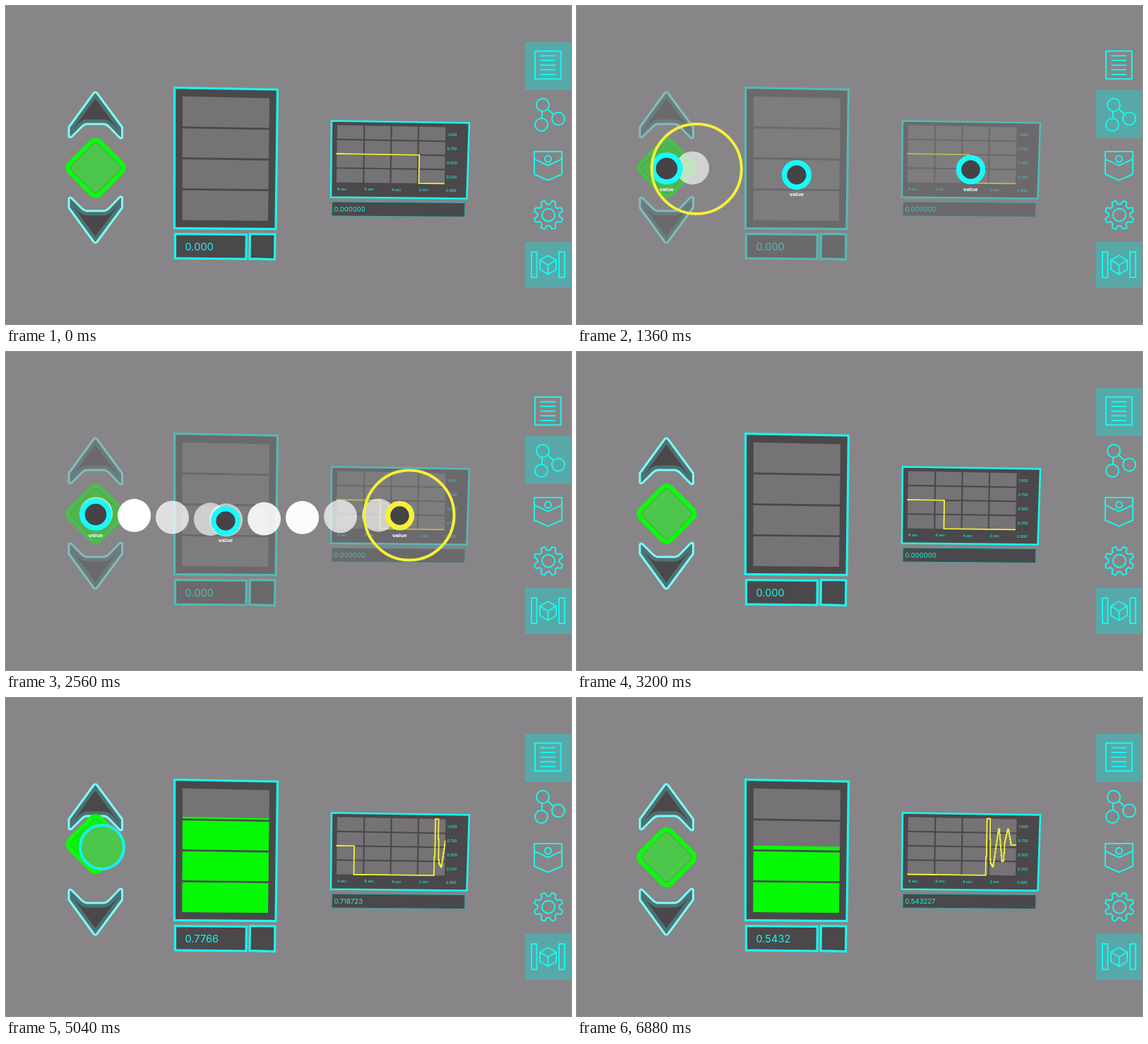
Animation of 800x450 px, one loop 6960 ms. Source, as an HTML page:

```html
<!DOCTYPE html>
<html lang="en">
<head>
<meta charset="utf-8">
<title>Linked controls</title>
<style>
  html, body { margin: 0; width: 100%; height: 100%; overflow: hidden; background: #878587; }
  svg { display: block; width: 100vw; height: 100vh; }
  text { font-family: Inter, Roboto, sans-serif; fill: #1cf5ec; }
  .node text { font: bold 8px "Liberation Sans", Arial, sans-serif; fill: #fff; text-anchor: middle; }
  .frame { fill: #4a484a; stroke: #18f7ee; stroke-width: 3.2; }
  .cell { fill: #757375; }
  .icon { fill: none; stroke: #18f7ee; stroke-width: 2; stroke-linejoin: round; }
  .lit { fill: #59a8a8; }
  .small text { font-size: 5.2px; font-weight: 500; }
</style>
</head>
<body>
<svg viewBox="0 0 800 450">
  <defs>
    <path id="chevron" d="M126.5 122Q128 122 129 123.5L164.5 171.5V186Q163 188 160.5 186L146 171Q142 167 138 167H115Q111 167 107 171L93 185Q90 187 89 184.5V171.5L124 123.5Q125 122 126.5 122Z"/>
    <clipPath id="chevronClip"><use href="#chevron"/></clipPath>
    <clipPath id="plotClip"><rect x="467.5" y="166" width="155" height="88"/></clipPath>
    <g id="arrow">
      <use href="#chevron" fill="#4a484a" stroke="#4d7274" stroke-width="13" clip-path="url(#chevronClip)"/>
      <use href="#chevron" fill="none" stroke="#7ffcf8" stroke-width="3" stroke-linejoin="round"/>
    </g>
  </defs>

  <g id="panels">
    <use href="#arrow"/>
    <use href="#arrow" transform="matrix(1 0 0 -1 0 457)"/>

    <path class="frame" d="M238.7 115.5L384.5 118.2L382 315.7L238.5 314.5Z"/>
    <g id="sliderCells"></g>
    <g id="sliderFill"></g>
    <path class="frame" d="M239.5 322.5L340.500 323.500L340 358L239.500 357Z"/>
    <path class="frame" d="M345.5 322.5L381 323L380.500 358.500L345 357.700Z"/>
    <text id="sliderText" x="253.5" y="346" font-size="14.6"></text>

    <path class="frame" style="stroke-width:2.6" d="M461 162.5L656 165.500L652.500 272.500L460 270.500Z"/>
    <g id="plotCells"></g>
    <g class="small" id="plotLabels"></g>
    <path id="plot" fill="none" stroke="#f5f03a" stroke-width="1.8" clip-path="url(#plotClip)"/>
    <path d="M461.5 277L650 278.500L649.500 298.500L461 297Z" fill="#4a484a" stroke="#2fa9a6"/>
    <text id="plotText" x="464.5" y="291" font-size="9.5"></text>

    <g id="diamond">
      <rect id="diamondFace" x="-30.5" y="-30.5" width="61" height="61" rx="9" transform="rotate(45)" stroke="#0bfb0b" stroke-width="6"/>
      <rect x="-26.5" y="-26.5" width="53" height="53" rx="5" transform="rotate(45)" fill="none" stroke="#35a035" opacity=".6"/>
    </g>
    <circle id="touch" r="31" fill="#4cc74c" stroke="#18eef5" stroke-width="4"/>
  </g>

  <g id="linking">
    <g id="balls" fill="#fff"></g>
    <g id="nodes"></g>
    <circle id="ring" r="63.5" fill="none" stroke="#f5f03a" stroke-width="4"/>
  </g>

  <rect class="lit" id="modeBox" x="734.5" width="66" height="68"/>
  <rect class="lit" x="734.5" y="333.5" width="66" height="65.5"/>
  <g class="icon">
    <path d="M749 63.700H785.700V103.200H749ZM756.500 70.500H778M756.500 77H778M756.500 83.700H778M756.500 90.300H778M756.500 97H778"/>
    <path d="M759 149V159M767 146L775 153"/>
    <circle cx="760" cy="140" r="9"/><circle cx="782" cy="159.5" r="9"/><circle cx="758" cy="168" r="9"/>
    <path d="M748 206H787V238L767.500 246.700L748 238ZM748 216.700L767.500 225.700L787 216.700"/>
    <circle cx="767.5" cy="216.300" r="4.5"/>
    <path id="gear"/><circle cx="768" cy="295.700" r="9"/>
    <path d="M744 348H751.500V384H744ZM783 348H791V384H783Z"/>
    <path d="M767.5 353L779 359.700V373L767.500 379.700L756 373V359.700ZM756 359.700L767.500 366.500L779 359.700M767.500 366.500V379.700"/>
  </g>
</svg>
<script>
const LOOP = 6960, STEP = 80;
const $ = id => document.getElementById(id);
const lerp = (a, b, k) => a + (b - a) * k;
const clamp = (k, low = 0, high = 1) => Math.max(low, Math.min(high, k));
const smooth = k => k * k * (3 - 2 * k);
const within = (t, from, to) => t >= from && t < to;
const show = (el, on) => { el.style.display = on ? "" : "none"; };

function add(parent, tag, attrs, text) {
  const el = document.createElementNS("http://www.w3.org/2000/svg", tag);
  for (const key in attrs) el.setAttribute(key, attrs[key]);
  if (text) el.textContent = text;
  return parent.appendChild(el);
}

// Linear interpolation through [time, value] keys.
function track(keys, t) {
  if (t <= keys[0][0]) return keys[0][1];
  const i = keys.findIndex(key => key[0] > t);
  if (i < 0) return keys[keys.length - 1][1];
  const [t0, a] = keys[i - 1], [t1, b] = keys[i];
  return lerp(a, b, (t - t0) / (t1 - t0));
}

// Maps the unit square (v upwards) onto a tilted panel: corners TL, TR, BR, BL.
const tilted = (tl, tr, br, bl) => (u, v) => [0, 1].map(i =>
  lerp(lerp(bl[i], br[i], u), lerp(tl[i], tr[i], u), v));
const slider = tilted([250, 128], [373, 130.5], [371, 304], [249.5, 303]);
const chart = tilted([469, 168.5], [622.5, 171.5], [621, 251.3], [468, 249.5]);
const quad = (map, u0, u1, v0, v1) =>
  `M${map(u0, v0)}L${map(u1, v0)}L${map(u1, v1)}L${map(u0, v1)}Z`;

function cells(parent, map, cols, rows, gapU, gapV) {
  for (let c = 0; c < cols; c++) for (let r = 0; r < rows; r++)
    add(parent, "path", { class: "cell", d: quad(map,
      c / cols + (c ? gapU : 0), (c + 1) / cols - (c < cols - 1 ? gapU : 0),
      r / rows + (r ? gapV : 0), (r + 1) / rows - (r < rows - 1 ? gapV : 0)) });
}
cells($("sliderCells"), slider, 1, 4, 0, 0.008);
cells($("plotCells"), chart, 4, 4, 0.007, 0.013);

["8 sec", "6 sec", "4 sec", "2 sec", "0.000"].forEach((s, i) =>
  add($("plotLabels"), "text", { x: 469 + i * 38.5, y: 261 + i * 0.4 }, s));
["1.000", "0.750", "0.500", "0.250"].forEach((s, i) =>
  add($("plotLabels"), "text", { x: 625 - i * 0.4, y: 184 + i * 19.9 }, s));

const sliderBars = [0, 1, 2, 3].map(() => add($("sliderFill"), "path", { fill: "#06fa06" }));

const nodeSpots = [[127, 230, 19], [311, 239, 17.3], [557.5, 231.5, 17]];
const rings = nodeSpots.map(([x, y, r]) => {
  const g = add($("nodes"), "g", { class: "node" });
  add(g, "text", { x, y: y + r + 13 }, "value");
  return add(g, "circle", { cx: x, cy: y, r, fill: "#454345", "stroke-width": 7.5 });
});
const balls = Array.from({ length: 14 }, () => add($("balls"), "circle", { r: 23.5 }));

// Eight rounded teeth.
const gearPoints = Array.from({ length: 160 }, (_, i) => {
  const a = i * Math.PI / 80;
  const r = 18 + 2.7 * clamp(-2 * Math.cos(8 * a), -1, 1);
  return `${768 + r * Math.cos(a)} ${295.7 + r * Math.sin(a)}`;
});
$("gear").setAttribute("d", `M${gearPoints.join("L")}Z`);

const valueKeys = [
  [3920, 0], [3950, 1], [4230, 1], [4340, 0.210374], [4400, 0.210374], [4600, 0.14],
  [5070, 0.82], [5130, 0.82], [5440, 0.24], [5580, 0.26], [5640, 0.42219], [5680, 0.5865],
  [5940, 0.82], [6000, 0.82], [6280, 0.543227]
];
const stepKeys = [[0, 585], [720, 573], [1920, 540], [3200, 520], [4400, 502], [5680, 484], [6880, 466]];
const cursorX = [[1280, 138], [1760, 326], [2160, 326], [2560, 571]];
const cursorY = [[1280, 229], [1760, 238], [2160, 238], [2560, 231]];
const ballAlpha = [[0, 0.6], [0.1, 0.75], [0.3, 1], [0.4, 1], [0.62, 0.7], [1, 0.6]];
const value = t => track(valueKeys, t);

function plotPath(t) {
  const speed = 0.0149, right = 621.5, lag = 100;
  const point = (x, v) => chart((x - 468.5) / 153, v);
  const stepX = track(stepKeys, t);
  let d = `M${point(460, 0.5)}L${point(stepX, 0.5)}L${point(stepX, 0)}`;
  let last = 0;
  for (let s = 4030; s <= t; s += 50) {
    const x = right - (t - s) * speed, v = value(s - lag);
    d += `L${point(x, last)}L${point(x, v)}`;
    last = v;
  }
  return d + `L${point(right, last)}`;
}

function drawPanels(t) {
  const v = value(t);
  sliderBars.forEach((bar, i) => {
    const low = i / 4 + (i ? 0.008 : 0);
    const high = Math.min(v - 0.005, (i + 1) / 4 - (i < 3 ? 0.008 : 0));
    bar.setAttribute("d", high > low ? quad(slider, 0, 1, low, high) : "");
  });
  $("sliderText").textContent = v ? v.toFixed(4) : "0.000";
  $("plotText").textContent = value(t - 40).toFixed(6);
  $("plot").setAttribute("d", plotPath(t));

  const touched = within(t, 3760, 6320);
  const held = touched || within(t, 1040, 2960);
  const y = t < 3950 ? lerp(229, 188.8, clamp((t - 3920) / 30)) : 268.8 - 80 * v;
  $("diamond").setAttribute("transform", `translate(127 ${y})`);
  $("diamondFace").setAttribute("fill", held ? "#0bf20b" : "#4cc74c");
  $("touch").setAttribute("transform", `translate(136 ${y + 4.3})`);
  show($("touch"), touched);
}

function drawLinks(t) {
  const cursor = [track(cursorX, t), track(cursorY, t)];
  const pressed = within(t, 1040, 2720);
  show($("ring"), pressed);
  $("ring").setAttribute("cx", cursor[0]);
  $("ring").setAttribute("cy", cursor[1]);
  rings.forEach((ring, i) => {
    const near = pressed && Math.abs(cursor[0] - nodeSpots[i][0]) < 40;
    ring.setAttribute("stroke", near ? "#f5f03a" : "#18fafa");
  });

  const links = [];
  if (t >= 1280) links.push([nodeSpots[0], t < 2000 ? cursor : nodeSpots[1]]);
  if (t >= 2160) links.push([nodeSpots[1], t < 2720 ? cursor : nodeSpots[2]]);
  const spacing = 54;
  const flow = (t * 0.06 + 63) % spacing;
  let used = 0;
  for (const [a, b] of links) {
    const length = Math.hypot(b[0] - a[0], b[1] - a[1]);
    for (let s = flow; s < length && used < balls.length; s += spacing) {
      const k = s / length, ball = balls[used++];
      ball.setAttribute("cx", lerp(a[0], b[0], k));
      ball.setAttribute("cy", lerp(a[1], b[1], k) - 1.3);
      ball.setAttribute("opacity", track(ballAlpha, k));
    }
  }
  balls.forEach((ball, i) => show(ball, i < used));
}

function draw(t) {
  const dim = smooth(clamp((t - 240) / 160)) * (1 - smooth(clamp((t - 2960) / 160)));
  $("panels").setAttribute("opacity", 1 - 0.54 * dim);
  $("linking").setAttribute("opacity", dim);
  $("modeBox").setAttribute("y", within(t, 320, 3040) ? 119 : 51);
  drawPanels(t);
  drawLinks(t);
}

const start = performance.now();
function tick() {
  const t = (performance.now() - start) % LOOP;
  draw(Math.floor(t / STEP) * STEP);
  requestAnimationFrame(tick);
}
tick();
</script>
</body>
</html>
```
